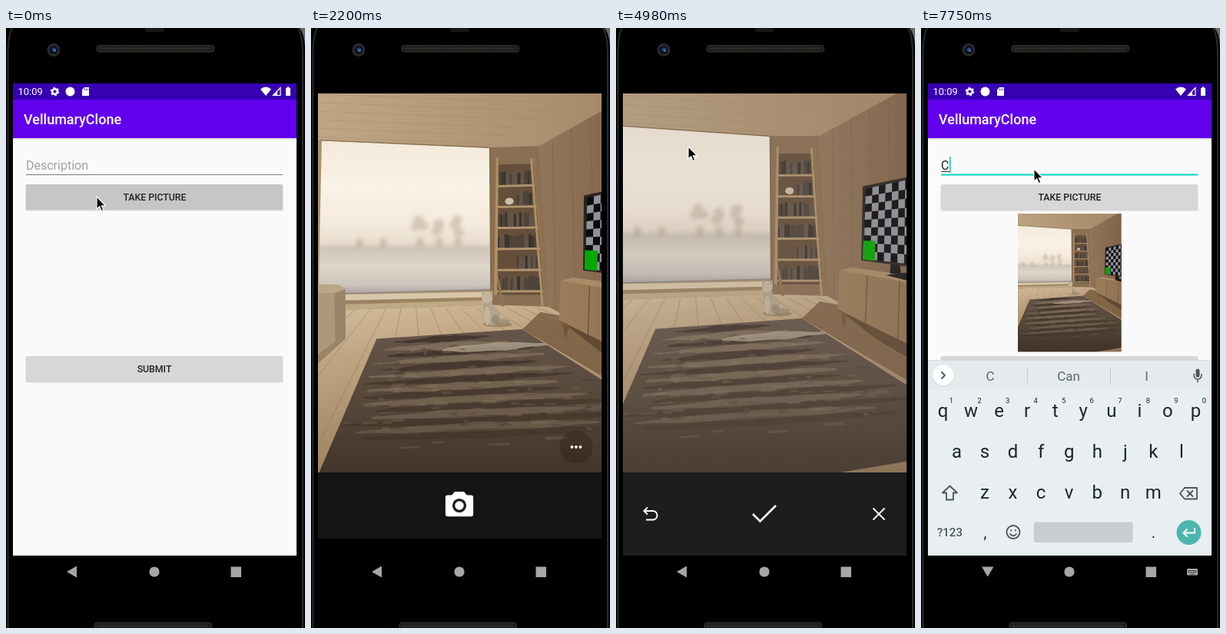
An HTML page for the animation above (8000 ms loop, 389 px wide and 779 px high).

```html
<!DOCTYPE html>
<html lang="en">
<head>
<meta charset="utf-8">
<title>Camera form</title>
<style>
html, body { margin: 0; width: 100%; height: 100%; overflow: hidden; background: #000; }
svg { display: block; width: 100vw; height: 100vh; font-family: Roboto, sans-serif; }
.mid { text-anchor: middle; }
.btn { font-size: 12.3px; font-weight: 500; fill: #222; text-anchor: middle; }
.line { fill: none; stroke-linecap: round; stroke-linejoin: round; }
</style>
</head>
<body>
<svg viewBox="0 0 389 779">
  <defs>
    <linearGradient id="gCeil"><stop offset=".2" stop-color="#bfa787"/><stop offset=".55" stop-color="#ad9170"/><stop offset="1" stop-color="#8f7252"/></linearGradient>
    <linearGradient id="gWall" x2="1"><stop offset="0" stop-color="#93765a"/><stop offset=".35" stop-color="#7d6045"/><stop offset="1" stop-color="#644a32"/></linearGradient>
    <linearGradient id="gWin" x2="0" y2="1">
      <stop offset="0" stop-color="#f3eadb"/><stop offset=".3" stop-color="#faf2e5"/><stop offset=".55" stop-color="#f4eadc"/>
      <stop offset=".66" stop-color="#e9dece"/><stop offset=".7" stop-color="#cfc5ba"/><stop offset=".82" stop-color="#dfd6ca"/>
      <stop offset=".94" stop-color="#cdc4bc"/><stop offset="1" stop-color="#a9a29f"/>
    </linearGradient>
    <linearGradient id="gFloor" x2=".3" y2="1"><stop offset="0" stop-color="#dfccad"/><stop offset=".2" stop-color="#bfa482"/><stop offset=".5" stop-color="#967a5a"/><stop offset="1" stop-color="#6f563c"/></linearGradient>
    <linearGradient id="gRug" x2="0" y2="1"><stop offset="0" stop-color="#66554a"/><stop offset=".35" stop-color="#57483a"/><stop offset=".7" stop-color="#43362b"/><stop offset="1" stop-color="#3b2f26"/></linearGradient>
    <linearGradient id="gCab"><stop offset="0" stop-color="#9c7d5b"/><stop offset="1" stop-color="#755839"/></linearGradient>
    <filter id="soft"><feGaussianBlur stdDeviation="2.500"/></filter>
    <clipPath id="view"><rect x="9" y="85" width="369" height="492"/></clipPath>
    <clipPath id="screen"><rect x="9" y="72" width="369" height="640"/></clipPath>
    <clipPath id="above"><rect x="9" y="72" width="369" height="613"/></clipPath>
    <g id="room" clip-path="url(#view)"></g>
    <g id="lens">
      <path d="M-20-16h7l5-6H8l5 6h7q4 0 4 4v29q0 4-4 4h-40q-4 0-4-4v-29q0-4 4-4z"/>
      <circle cy="2" r="9.800" fill="none" stroke="#1b1b1b" stroke-width="4.400"/>
    </g>
  </defs>

  <!-- phone body -->
  <rect width="389" height="779"/>
  <path d="M382 0h7v24Q388 8 382 0z" fill="#686868"/>
  <path d="M8 0Q2.500 10 2.500 36V779M380 0Q386 10 386 36V779" fill="none" stroke="#2b2b29" stroke-width="2"/>
  <path d="M181 0h25v2q0 3-3 3h-19q-3 0-3-3z" fill="#171717"/>
  <circle cx="62" cy="28.500" r="8.500" fill="#2a2a2b"/><circle cx="62" cy="28.500" r="5.500" fill="#0d1226"/>
  <circle cx="62.500" cy="28" r="2.600" fill="#2c4580"/><circle cx="63.500" cy="29.500" r="1" fill="#8fa6d8"/>
  <g fill="#1d1d1b" stroke="#34342f">
    <rect x="118" y="22.500" width="152.500" height="8.500" rx="3"/><rect x="115" y="772" width="152.500" height="12" rx="3"/>
    <path d="M122 26.800H267M119 776.500H264" stroke="#3c3c35" stroke-width="3" stroke-dasharray="1 1.500"/>
  </g>

  <g fill="#a6a6a6">
    <path id="back" d="M79 706L92 698.500V713.500z"/><path id="down" d="M79 699.500H94.500L86.700 712.500z"/>
    <circle cx="193" cy="706" r="6.600"/><rect x="292.500" y="699.500" width="13.500" height="13.500"/>
    <g id="kbIcon"><rect x="346" y="702" width="14" height="8.500" rx="1"/><path d="M347.500 704.500H359M347.500 706.500H359M350 709H356" stroke="#000" stroke-dasharray="1.200 1"/></g>
  </g>

  <!-- form -->
  <g id="form" clip-path="url(#screen)">
    <rect x="9" y="72" width="369" height="613" fill="#fafafa"/>
    <rect x="9" y="72" width="369" height="22" fill="#3700b3"/>
    <g fill="#fff">
      <text x="15.500" y="87" font-size="13">10:09</text>
      <circle cx="63.500" cy="82.500" r="3.300" fill="none" stroke="#fff" stroke-width="2.600"/>
      <circle cx="63.500" cy="82.500" r="5" fill="none" stroke="#fff" stroke-width="1.600" stroke-dasharray="2.600 2.640"/>
      <circle cx="83.500" cy="82.500" r="6"/>
      <path d="M102 77h6v11h-9v-8z"/><path d="M102.500 78.500v2.500M104.500 78.500v2.500M106.500 78.500v2.500" stroke="#3700b3" stroke-width=".8"/>
      <path d="M331 79.500Q338 73.500 345 79.500L338 88z"/>
      <path d="M347.500 87.500H357V77.500z" fill="none" stroke="#fff" stroke-width="1.200"/><path d="M347 88H353V81.500z"/>
      <path d="M364 78h1.500v-1.500h3V78h1.500v10h-6z"/>
    </g>
    <g id="content">
      <rect x="9" y="93" width="369" height="592" fill="#fafafa"/>
      <rect x="9" y="143" width="369" height="1.500" fill="#d9d9dc"/>
      <rect x="9" y="93" width="369" height="50" fill="#6200ee"/>
      <text x="23" y="125" font-size="18" font-weight="500" fill="#fff">VellumaryClone</text>
      <text id="hint" x="26" y="184" font-size="16" fill="#a2a2a2">Description</text>
      <g id="typed"><text x="26" y="184" font-size="16" fill="#222">C</text><path d="M26.500 186.500H37" stroke="#333"/></g>
      <rect id="caret" y="167" width="1.500" height="21" fill="#03cdb9"/>
      <rect id="rule" x="26" width="334"/>
      <rect x="25.500" y="204" width="335" height="33.500" rx="2" fill="#d9d9d9"/>
      <rect id="take" x="26" y="203" width="334" height="33" rx="1.500"/>
      <text class="btn" x="193.500" y="224.400">TAKE PICTURE</text>
      <use id="thumb" href="#room" transform="translate(126 241) scale(.3645) translate(-9 -85)"/>
      <rect x="25.500" y="427" width="335" height="33.500" rx="2" fill="#d9d9d9"/>
      <rect x="26" y="426" width="334" height="33" rx="1.500" fill="#d6d7d7"/>
      <text class="btn" x="193" y="447">SUBMIT</text>
    </g>
  </g>

  <g clip-path="url(#above)"><g id="keys">
    <rect x="9" y="431" width="369" height="2" fill="#d5d9da"/>
    <rect x="9" y="432" width="369" height="253" fill="#e9eef1"/>
    <rect x="9" y="432" width="369" height="38" fill="#e5eaed"/>
    <circle cx="29" cy="452" r="14" fill="#d2d8db"/><circle cx="29" cy="451" r="13.500" fill="#fff"/>
    <g class="line" stroke="#4a565b" stroke-width="1.800">
      <path d="M27 447l4 4-4 4"/>
      <path d="M37.500 594.500l9.500 9h-5v9h-9v-9h-5z"/>
      <path d="M343 597h16v14.500h-16l-6-7.200zM346.500 601l7 7M353.500 601l-7 7"/>
      <circle cx="120" cy="654.500" r="8.500"/><path d="M116 657q4 4.500 8 0M117 652v.5M123 652v.5"/>
      <path d="M355 449.500q0 6.500 5 6.500t5-6.500M360 456v3.500" stroke-width="1.500"/>
    </g>
    <rect x="357.500" y="442.500" width="5" height="11" rx="2.500" fill="#4a565b"/>
    <path d="M138.500 440v22M246.500 440v22" stroke="#c6cdd0"/>
    <g id="words" class="mid" font-size="17" fill="#5d686d"><text x="90" y="458">C</text><text x="192" y="458">Can</text><text x="293.500" y="458">I</text></g>
    <rect x="147" y="641.500" width="128.500" height="26.500" rx="2.500" fill="#c8cdd1"/>
    <circle cx="348.500" cy="655" r="16" fill="#4db6ac"/>
    <path class="line" d="M356 650v5.500h-14M346 651l-4.500 4.500 4.500 4.500" stroke="#fff" stroke-width="2"/>
    <g id="caps" class="mid" fill="#1a272c"><text x="37.500" y="660" font-size="15" font-weight="500" fill="#4a565b">?123</text></g>
  </g></g>

  <!-- camera -->
  <g id="splash"><rect x="9" y="72" width="369" height="612.500" fill="#1d1d1d"/><use href="#lens" x="193" y="376" fill="#6a6b6e"/></g>
  <g id="camera">
    <use href="#room"/>
    <g id="live">
      <rect x="9" y="577" width="369" height="86" fill="#151515"/>
      <use href="#lens" transform="translate(193 618.500) scale(.755)" fill="#fff"/>
      <circle cx="345" cy="544" r="21.500" fill="#2b211a" opacity=".4"/>
      <path class="line" d="M339.500 544h0M345 544h0M350.500 544h0" stroke="#fff" stroke-width="3.800"/>
    </g>
    <g id="review">
      <rect x="9" y="85" width="369" height="492" fill="#8b8378" opacity=".15"/>
      <rect x="9" y="577" width="369" height="108" fill="#1d1d1d"/>
      <g fill="none" stroke="#fff" stroke-width="2">
        <path d="M41 622.500l-4.500 4.500 4.500 4.500M37 627h11.500a5.800 5.800 0 0 1 0 11.500H39"/>
        <path d="M178 631l9.500 9.500L208 620" stroke-width="2.600"/>
        <path d="M334.500 623.500l15 15M349.500 623.500l-15 15"/>
      </g>
    </g>
  </g>
  <path id="cursor" d="M0 0V16L3.700 12.600 6.300 18.600 8.800 17.500 6.300 11.800H11.500z" stroke="#fff" stroke-width="1.100"/>
</svg>

<script>
const $ = id => document.getElementById(id);
const set = (node, attrs) => { for (const k in attrs) node.setAttribute(k, attrs[k]); return node; };
const make = (tag, attrs, parent) => parent.appendChild(set(document.createElementNS('http://www.w3.org/2000/svg', tag), attrs));
const show = (id, on) => { $(id).style.display = on ? '' : 'none'; };
const mix = (a, b, u) => a + (b - a) * u;
const ramp = (t, a, b) => Math.min(1, Math.max(0, (t - a) / (b - a)));
const ease = u => u * u * (3 - 2 * u);
const times = (n, fn) => Array.from({ length: n }, (_, i) => fn(i));
let seed = 11;
const rand = (a = 0, b = 1) => mix(a, b, (seed = seed * 16807 % 2147483647) / 2147483647);

// ---- keyboard caps ----
function caps(chars, x, y, size = 24) {
  [...chars].forEach((c, i) => { make('text', { x: x + i * 36.55, y, 'font-size': size }, $('caps')).textContent = c; });
}
caps('qwertyuiop', 28.5, 505);
caps('asdfghjkl', 46.5, 558);
caps('zxcvbnm', 83, 611);
caps('1234567890', 39.5, 487, 9.5);
caps(',', 83.5, 662, 20);
caps('.', 302.5, 662, 20);

// ---- room: flat shapes, re-projected as the camera turns ----
const shapes = [];
function shape(fill, rings, attrs = {}, parent = $('room')) {
  shapes.push({ node: make('path', { fill, ...attrs }, parent), rings });
}
const lines = (stroke, opacity, rings) => shape('none', rings, { stroke, opacity });
const box = (x, y, w, h) => [x, y, x + w, y, x + w, y + h, x, y + h];
const oval = (cx, cy, rx, ry) => times(20, i => i * Math.PI / 10).flatMap(a => [cx + rx * Math.cos(a), cy + ry * Math.sin(a)]);
// point inside a quad given as [tl, tr, br, bl]
const inQuad = (q, u, v) => [0, 1].map(k => mix(mix(q[k], q[2 + k], u), mix(q[6 + k], q[4 + k], u), v));
const patch = (q, u0, u1, v0, v1) => [...inQuad(q, u0, v0), ...inQuad(q, u1, v0), ...inQuad(q, u1, v1), ...inQuad(q, u0, v1)];

function buildShell() {
  shape('#a8906f', [box(-300, -100, 1000, 900)]);
  shape('url(#gCeil)', [[-250, -60, 620, -60, 258, 137, 193, 137, -250, 105]]);
  lines('#8a7052', .2, times(6, i => [-200, 104 - i * 12, 193 + i * 20, 132 - i * 10]));
  shape('url(#gWall)', [[258, 137, 620, -60, 640, 548, 266, 346]]);
  lines('#5d452e', .25, times(6, i => [275 + i * 24, 128 - i * 12.6, 277 + i * 25, 352 + i * 13]));
  shape('#8b6f53', [[192, 137, 258, 137, 268, 347, 194, 347]]);

  shape('url(#gFloor)', [[-300, 356, 194, 343, 268, 345, 640, 548, 680, 820, -320, 820]]);
  lines('#866b4c', .45, times(28, i => -5 + i * .3).map(k => [90 + k * 66, 347, 90 + k * 250, 531]));
  shape('#715539', [[235, 374, 258, 352, 290, 358, 640, 548, 640, 612]], { opacity: .75 });

  // window and sill
  const sill = [-36, 330, 196, 326, 196, 343, -36, 351];
  shape('#9c8261', [sill]);
  shape('#d8c6a8', [patch(sill, 0, 1, 0, .4)]);
  shape('#bfa985', [patch(sill, 0, 1, .65, 1)]);
  shape('url(#gWin)', [[-34, 121, 193, 138, 194, 323, -36, 329]]);
  const haze = make('g', { filter: 'url(#soft)', opacity: .5 }, $('room'));
  for (const x of [20, 52, 102, 127, 152]) {
    shape('#b3a18b', [oval(x, 261, 5, 7)], {}, haze);
    if (x > 60) shape('#b8a794', times(3, () => oval(x + rand(-6, 6), rand(230, 252), 7, 6)), {}, haze);
  }
  lines('#777582', .7, [[-36, 329, 194, 323]]);
  lines('#80684c', 1, [[195, 138, 195.5, 326], [-36, 120, 193, 137]]);
}

function buildShelf() {
  shape('#5f4a37', [[205, 160, 251, 160, 262, 330, 203, 330]], { opacity: .85 });
  const tones = ['#3c342e', '#4d433a', '#625549'].map(color => ({ color, rings: [] }));
  const boards = times(6, i => ({ y: 187 + i * 27.4, x0: 204 - i * .6, x1: 254 + i * 1.8 }));
  boards.forEach(({ y, x0, x1 }, i) => {
    let x = i === 1 || i === 4 ? 228 : x0 + 2;
    while (x < x1 - 6) {
      const w = rand(1.8, 4.2), h = rand(14, 19);
      tones[Math.floor(rand(0, 3))].rings.push(box(x, y - h, w, h));
      x += w + .3;
    }
  });
  tones.forEach(({ color, rings }) => shape(color, rings));
  shape('#cfc0a8', [oval(219, 208.5, 5.5, 4.5)]);
  shape('#b3966f', boards.map(({ y, x0, x1 }) => box(x0, y, x1 - x0, 2.8)));
  shape('#90734f', [[249, 150, 252, 150, 267, 345, 263, 345], [200, 296, 203, 296, 212, 345, 208, 345]]);
  shape('#ad9069', [[202, 151, 205, 151, 203, 330, 199, 330], [246, 153, 249, 153, 262, 344, 259, 344]]);
}

function buildRug() {
  const weave = [44, 388, 235, 374, 575, 590, -62, 633];
  shape('url(#gRug)', [[44, 388, 235, 374, 492, 537, -62, 633]]);
  const band = (u0, u1, v, h, color, opacity) => {
    const edge = side => times(13, i => inQuad(weave, mix(u0, u1, i / 12),
      v + side * h * (.2 + .8 * Math.sin(i / 12 * Math.PI)) + rand(-.004, .004)));
    shape(color, [[...edge(-1), ...edge(1).reverse()].flat()], { opacity });
  };
  // light and dark streaks take turns, wider and fainter toward the viewer
  for (let i = 0; i < 15; i++) {
    const v = .025 + i * .037, light = i % 2;
    band(rand(0, .15), rand(.75, 1), v, .015 + i * .0007, light ? '#87745f' : '#35291f', (light ? .75 : .65) - i * .025);
  }
  band(.42, 1, .085, .022, '#b0a18c', .8);
  for (const [color, n] of [['#9a8871', 80], ['#33281f', 60]])
    shape(color, times(n, () => {
      const u = rand(0, .93), v = rand(.05, .6);
      return patch(weave, u, u + rand(.015, .06), v, v + rand(.006, .02));
    }), { opacity: .22 });
}

function buildCat() {
  shape('#7d6648', [oval(203, 368, 19, 3.5)], { opacity: .5 });
  shape('#a39278', [oval(209, 364, 10, 3)]);
  shape('#b3a38b', [oval(196, 357, 10, 12.5), oval(191, 346, 6.5, 10), [183, 333, 183.5, 324, 189, 329], [191, 329, 197, 324, 197, 334]]);
  shape('#c4b59e', [oval(190, 334, 7, 6.5), oval(190, 357, 3.5, 12)]);
  shape('#94836a', [oval(201, 362, 5, 6)], { opacity: .7 });
}

function buildFurniture() {
  const front = [284, 312, 560, 362, 560, 500, 281, 363];
  shape('#4d3826', [[282, 362, 560, 480, 560, 535, 330, 400]], { opacity: .6 });
  shape('#a98b66', [[284, 312, 300, 308, 560, 345, 560, 362]]);
  shape('url(#gCab)', [front]);
  lines('#5f472e', 1, [.13, .28, .48].map(u => [...inQuad(front, u, 0), ...inQuad(front, u, 1)]));
  lines('#5f472e', 1, [[281, 363, 560, 500]]);
  shape('#735636', [[286, 365, 294, 368, 290.5, 384, 288, 384]]);

  const tv = [318, 206, 437, 181, 437, 311, 315, 297];
  shape('#1b1815', [[350, 303, 362, 304, 363, 317, 349, 316], [344, 318, 368, 315, 396, 320, 374, 326]]);
  shape('#2a241f', [[314, 203, 440, 177, 440, 316, 312, 299]]);
  shape('#0c0c0e', [tv]);
  const cells = times(126, i => [i % 14, Math.floor(i / 14)]).filter(([c, r]) => (c + r) % 2);
  shape('#92939a', cells.map(([c, r]) => patch(tv, c / 14, (c + 1) / 14, r / 9, (r + 1) / 9)));
  shape('#06a806', [patch(tv, -.01, .12, .74, 1.01)]);

  // sofa
  shape('#9a8467', [[-240, 318, -8, 317, 1, 322, 2, 388, -36, 422, -240, 600]]);
  shape('#bba685', [[-240, 314, -10, 316, 1, 322, -14, 328, -240, 330]]);
  shape('#ae9879', [[-240, 330, -14, 328, -12, 392, -40, 412, -240, 560]]);
}

let aimed = null;
function aim(yaw) {
  if (aimed === yaw) return;
  aimed = yaw;
  const F = 500, pitch = yaw * .42;
  const cy = Math.cos(yaw), sy = Math.sin(yaw), cp = Math.cos(pitch), sp = Math.sin(pitch);
  const project = (px, py) => {
    const x = px - 193, y = py - 331, z = F * cy - x * sy, k = F / (z * cp - y * sp);
    return (193 + (x * cy + F * sy) * k).toFixed(1) + ' ' + (331 + (y * cp + z * sp) * k).toFixed(1);
  };
  for (const { node, rings } of shapes) {
    const end = node.getAttribute('fill') === 'none' ? '' : 'Z';
    node.setAttribute('d', rings.map(r => 'M' + times(r.length / 2, i => project(r[2 * i], r[2 * i + 1])).join('L') + end).join(''));
  }
}

// ---- timeline ----
const LOOP = 8000, OPEN = 540, PREVIEW = 1080, SHOT = 4130, RETURN = 6380, FOCUS = 7330, TYPE = 7745;

// pointer moves: from, to, where, sideways bow
const moves = [
  { a: 500, b: 685, x: 131, y: 239 },
  { a: 3200, b: 3450, x: 200, y: 622 },
  { a: 3840, b: 3850, x: 350, y: 271 },
  { a: 4270, b: 4970, x: 94, y: 154 },
  { a: 4990, b: 5650, x: 191, y: 627, bow: 95 },
  { a: 5960, b: 6500, x: 199, y: 622 },
  { a: 6600, b: 7250, x: 147, y: 183 }
];
function pointer(t) {
  let x = 118, y = 219;
  for (const m of moves) {
    const u = ease(ramp(t, m.a, m.b));
    x = mix(x, m.x, u) + (m.bow || 0) * Math.sin(Math.PI * u);
    y = mix(y, m.y, u);
  }
  return `translate(${x} ${y})`;
}

function draw(t) {
  const form = t < OPEN || t >= RETURN, live = t >= PREVIEW && t < SHOT, review = t >= SHOT && t < RETURN;
  const focus = t >= FOCUS, typed = t >= TYPE;
  const visible = {
    form, live, review, splash: t >= OPEN && t < PREVIEW, camera: live || review, thumb: t >= RETURN,
    keys: focus, down: focus, kbIcon: focus, caret: focus, back: !focus,
    typed, words: typed, hint: !typed, cursor: t < 1350 || t >= 3300
  };
  for (const id in visible) show(id, visible[id]);

  aim(mix(.1425, 0, ramp(t, 1620, 2910)) + .0135 * ramp(t, 2910, 3180));
  const zoom = t < OPEN ? 1 + .02 * ramp(t, 100, 260) : 1 + .015 * (1 - ramp(t, RETURN, 6650));
  set($('content'), { transform: `translate(193.5 389) scale(${zoom}) translate(-193.5 -389)` });
  set($('keys'), { transform: `translate(0 ${253 * (1 - ease(ramp(t, FOCUS - 60, 7600)))})` });
  set($('caret'), { x: typed ? 37 : 26 });
  set($('rule'), focus ? { y: 189.5, height: 2, fill: '#03d5c0' } : { y: 190, height: 1, fill: '#7c7c7c' });
  set($('take'), { fill: t < OPEN ? '#c5c6c6' : '#d6d7d7' });
  set($('cursor'), { transform: pointer(t) });
}

buildShell();
buildShelf();
buildRug();
buildCat();
buildFurniture();
const start = performance.now();
function tick() {
  draw((performance.now() - start) % LOOP);
  requestAnimationFrame(tick);
}
tick();
</script>
</body>
</html>
```
